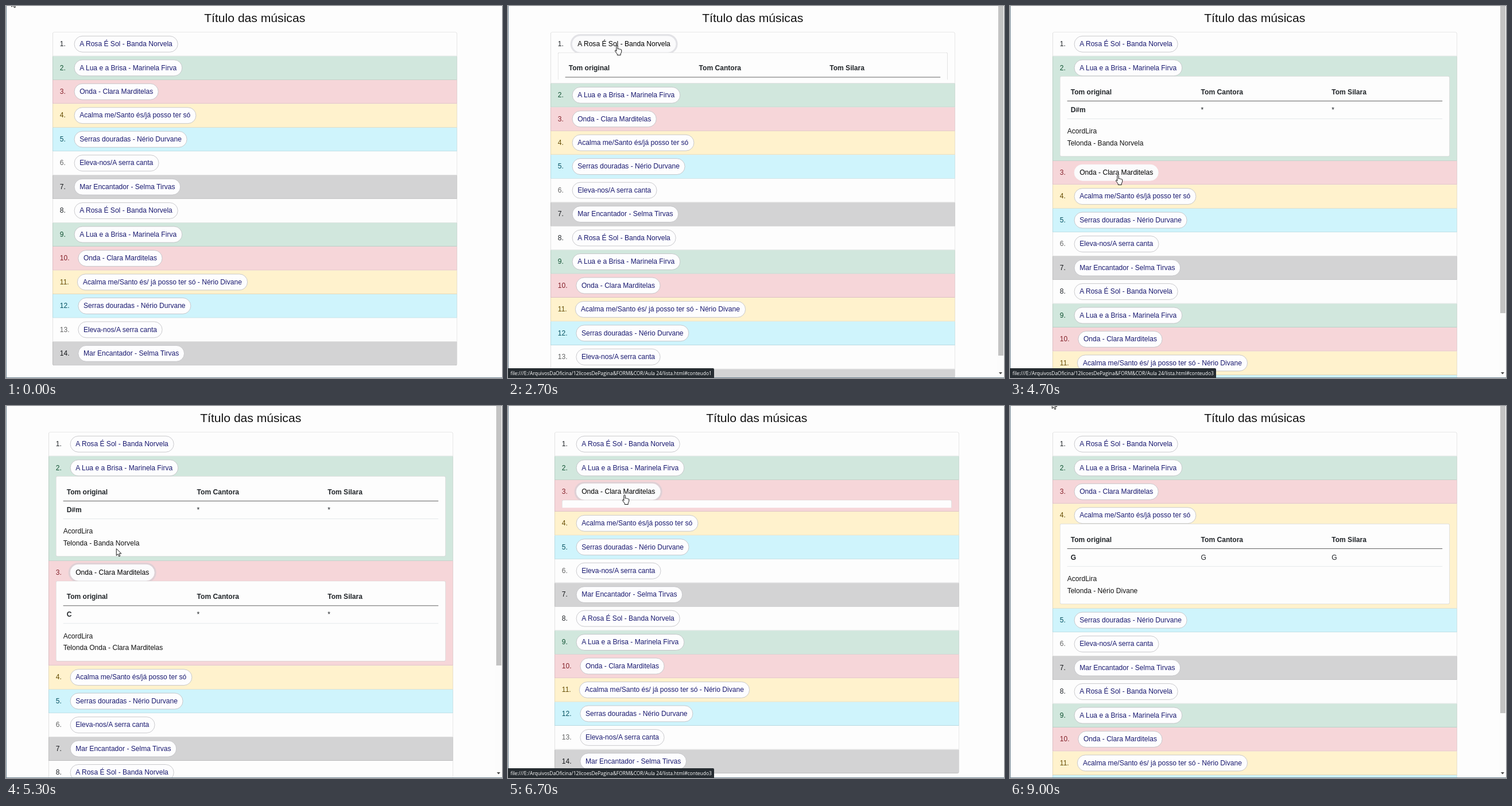
An HTML page for the animation above (9100 ms loop, 864 px wide and 648 px high).

```html
<!DOCTYPE html>
<html lang="pt-BR">
<head>
<meta charset="utf-8">
<title>Título das músicas</title>
<style>
  html, body { margin: 0; width: 100%; height: 100%; overflow: hidden; background: #fdfdfd; }
  #stage { position: relative; width: 864px; height: 648px; overflow: hidden; }
  #stage > * { position: absolute; }

  /* The page is laid out at full size and scaled down to the stage. */
  #page { width: 934.5px; transform: scale(.7538); transform-origin: 0 0;
    font: 16px/24px "Liberation Sans", Arial, sans-serif; color: #212529; }
  h1 { position: absolute; top: 10.5px; width: 100%; margin: 0; text-align: center; font-size: 28px;
    font-weight: 400; line-height: 1.2; color: #111; }
  ol { position: absolute; top: 60px; box-sizing: border-box; width: 100%; margin: 0; padding: 0;
    list-style: none; border-radius: 4px; overflow: hidden; }
  li { padding: 8px 16px; border: 1px solid rgba(0,0,0,.14); border-top-width: 0; }
  li:first-child { border-top-width: 1px; border-radius: 4px 4px 0 0; }
  li:last-child { border-radius: 0 0 4px 4px; }
  .head { display: flex; align-items: center; height: 38px; white-space: pre; }
  .pill { box-sizing: border-box; height: 38px; margin-left: 19.3px; padding: 6px 12px;
    border: 1px solid #b9b9bd; border-radius: 19px; background: #fdfdfe; color: #191970; }
  .pill.hover, .pill.focus { border-color: #f9fafb; background: #fbfbfc; color: #000; }
  .pill.focus { box-shadow: 0 0 0 4px rgba(205,205,212,.55); }
  .fold { position: relative; height: 0; overflow: hidden; }
  .panel { box-sizing: border-box; height: 186px; padding: 16px; border: 1px solid rgba(0,0,0,.14);
    border-radius: 4px; background: #fdfdfd; color: #212529; }
  .cells { display: grid; grid-template-columns: 301px 302px 1fr; border-bottom: 1px solid #dee2e6; }
  .cells.top { border-color: #333; font-weight: 700; }
  .cells span { padding: 8px; }
  .cells span:first-child { font-weight: 700; }
  .links { margin-top: 16px; line-height: 26.5px; color: #111; }

  #edge { inset: 0; box-sizing: border-box; border: solid #6d8391; border-width: 0 0 1px 1px; }
  #bar { left: 852px; top: 0; width: 12px; height: 647px; background: #fcfcfc; }
  #thumb { position: absolute; left: 1.5px; width: 9.5px; background: #c3c3c3; }
  #bar svg { position: absolute; left: 3px; top: 638px; }
  #status { left: 0; top: 631px; height: 17px; box-sizing: border-box; padding-left: 4.5px;
    background: #262c31; color: #fff; font: 8.44px/17px "Open Sans", "Noto Sans", sans-serif;
    white-space: pre; border-radius: 0 2px 0 0; }
  #cursor { left: 0; top: 0; overflow: visible; }
</style>
</head>
<body>
<div id="stage">
  <div id="page"><h1>Título das músicas</h1><ol id="list"></ol></div>
  <div id="edge"></div>
  <div id="bar"><div id="thumb"></div><svg width="6" height="4"><path d="M0 0H6L3 3.5Z" fill="#444"/></svg></div>
  <div id="status"></div>
  <svg id="cursor" width="1" height="1">
    <g fill="#fff" stroke="#111" stroke-width="1.3" stroke-linejoin="round">
      <path id="arrow" transform="scale(.75)" d="M.5 .5V16.5L4.2 13L6.6 18.6L9.2 17.5L6.8 12H12Z"/>
      <path id="hand" transform="scale(.75) translate(-6.6 -1)" d="M5 14V2.5a1.6 1.6 0 0 1 3.2 0V9l1.4-.6a1.5 1.5 0 0 1 1.8 1l1.3-.3a1.5 1.5 0 0 1 1.6 1l1-.1a1.4 1.4 0 0 1 1.6 1.4v4.5l-2 4V23H7v-2.5L2 14a1.5 1.5 0 0 1 2-2z"/>
    </g>
  </svg>
</div>
<script>
const LOOP = 9100, STEP = 100, SCALE = .7538, PANEL = 187, FOLD_TIME = 350;
const $ = id => document.getElementById(id);

const themes = [['#fdfdfd', '#212529'], ['#d1e7dd', '#0f5132'], ['#f6d6d9', '#842029'], ['#fff2cd', '#664d03'],
  ['#cff4fc', '#055160'], ['#fdfdfd', '#636464'], ['#d3d3d4', '#141619']];
const week = ['A Rosa É Sol - Banda Norvela', 'A Lua e a Brisa - Marinela Firva', 'Onda - Clara Marditelas',
  'Acalma me/Santo és/já posso ter só', 'Serras douradas - Nério Durvane', 'Eleva-nos/A serra canta',
  'Mar Encantador - Selma Tirvas'];
const songs = [...week, ...week];
songs[10] = 'Acalma me/Santo és/ já posso ter só - Nério Divane';
const details = [
  ['A#', 'A', '*', 'Telonda - Banda Norvela'],
  ['D#m', '*', '*', 'Telonda - Banda Norvela'],
  ['C', '*', '*', 'Telonda Onda - Clara Marditelas'],
  ['G', 'G', 'G', 'Telonda - Nério Divane']];

const cells = (texts, cls = '') =>
  `<div class="cells ${cls}">${texts.map(s => `<span>${s}</span>`).join('')}</div>`;
const panel = ([a, b, c, link]) => `<div class="fold"><div class="panel">
  ${cells(['Tom original', 'Tom Cantora', 'Tom Silara'], 'top')}${cells([a, b, c])}
  <div class="links">AcordLira<br>${link}</div></div></div>`;
$('list').innerHTML = songs.map((song, i) => {
  const [back, ink] = themes[i % 7];
  return `<li style="background:${back};color:${ink}"><div class="head">${i + 1}.<span class="pill">${song}</span></div>${
    details[i] ? panel(details[i]) : ''}</li>`;
}).join('');
const pills = [...document.querySelectorAll('.pill')];
const folds = [...document.querySelectorAll('.fold')];

// Start times of alternate opening and closing, per song
const toggles = [[1052, 2565], [3310, 5758], [4860, 6480], [7602]];
const focusAt = [[0, 0], [1000, 1], [3000, 2], [4600, 0], [4900, 3], [5700, 2], [6450, 3], [7500, 4], [8700, 0]];

const folder = 'E:/ArquivosDaOficina/12licoesDePagina&FORM&COR/Aula 24/lista.h';
const brief = folder + '...';
const full = n => `file:///${folder}tml#conteudo${n}`;
const statusAt = [[0, ''], [1100, brief], [2100, full(1)], [2900, full(2)], [3800, ''], [4200, brief], [4400, full(3)],
  [5300, ''], [5400, brief], [5500, full(2)], [6300, full(3)], [7500, full(4)], [8400, '']];

const path = [[0, 9.5, -11], [600, 494, 546], [750, 494, 546], [1000, 189, 68], [2100, 189, 68], [2200, 190, 69],
  [2800, 190, 69], [3000, 200, 112], [3650, 200, 112], [4400, 188, 293], [4700, 188, 295], [5200, 188, 295],
  [5500, 203, 114], [6100, 203, 114], [6400, 203, 155], [6800, 203, 155], [6900, 203, 165], [7200, 203, 189],
  [8200, 203, 189], [8700, 73, -8], [LOOP, 73, -8]];
const stutters = [1400, 3600, 5800];

const latest = (list, t) => list.filter(k => k[0] <= t).pop();

// cubic-bezier(.25, .1, .25, 1)
function ease(x) {
  if (x <= 0) return 0;
  if (x >= 1) return 1;
  const curve = (a, b, s) => 3 * a * s * (1 - s) ** 2 + 3 * b * s * s * (1 - s) + s ** 3;
  let lo = 0, hi = 1;
  for (let i = 0; i < 24; i++) {
    const mid = (lo + hi) / 2;
    if (curve(.25, .25, mid) < x) lo = mid; else hi = mid;
  }
  return curve(.1, 1, lo);
}

function pointer(t) {
  const i = path.findIndex(k => k[0] > t);
  const [t0, x0, y0] = path[i - 1], [t1, x1, y1] = path[i];
  const u = (t - t0) / (t1 - t0), s = u * u * (3 - 2 * u);
  return [x0 + (x1 - x0) * s, y0 + (y1 - y0) * s];
}

function draw(t) {
  let extra = 0;
  folds.forEach((fold, i) => {
    const open = toggles[i].reduce((sum, start, k) => sum + (k % 2 ? -1 : 1) * ease((t - start) / FOLD_TIME), 0);
    fold.style.height = PANEL * open + 'px';
    extra += PANEL * open * SCALE;
  });

  const scrolls = extra > 20;
  $('page').style.left = (scrolls ? 74.2 : 80.9) + 'px';
  $('bar').style.display = scrolls ? '' : 'none';
  $('thumb').style.height = 413000 / (631 + extra) + 'px';

  const [x, y] = pointer(t), focus = latest(focusAt, t)[1];
  const origin = $('stage').getBoundingClientRect();
  let over = false;
  pills.forEach((pill, i) => {
    const r = pill.getBoundingClientRect(), px = x + origin.left, py = y + origin.top;
    const hit = px >= r.left && px <= r.right && py >= r.top && py <= r.bottom;
    over ||= hit;
    pill.classList.toggle('hover', hit);
    pill.classList.toggle('focus', i + 1 === focus);
  });
  $('cursor').style.transform = `translate(${x}px, ${y}px)`;
  $('hand').style.display = over ? '' : 'none';
  $('arrow').style.display = over ? 'none' : '';

  const text = latest(statusAt, t)[1];
  $('status').textContent = text;
  $('status').style.display = text ? '' : 'none';
  $('status').style.width = (text === brief ? 287 : 359) + 'px';
}

let shown = -1;
const begin = performance.now();
function tick() {
  let t = Math.floor((performance.now() - begin) % LOOP / STEP) * STEP;
  if (stutters.includes(t)) t -= STEP;
  if (t !== shown) draw(shown = t);
  requestAnimationFrame(tick);
}
tick();
</script>
</body>
</html>
```
